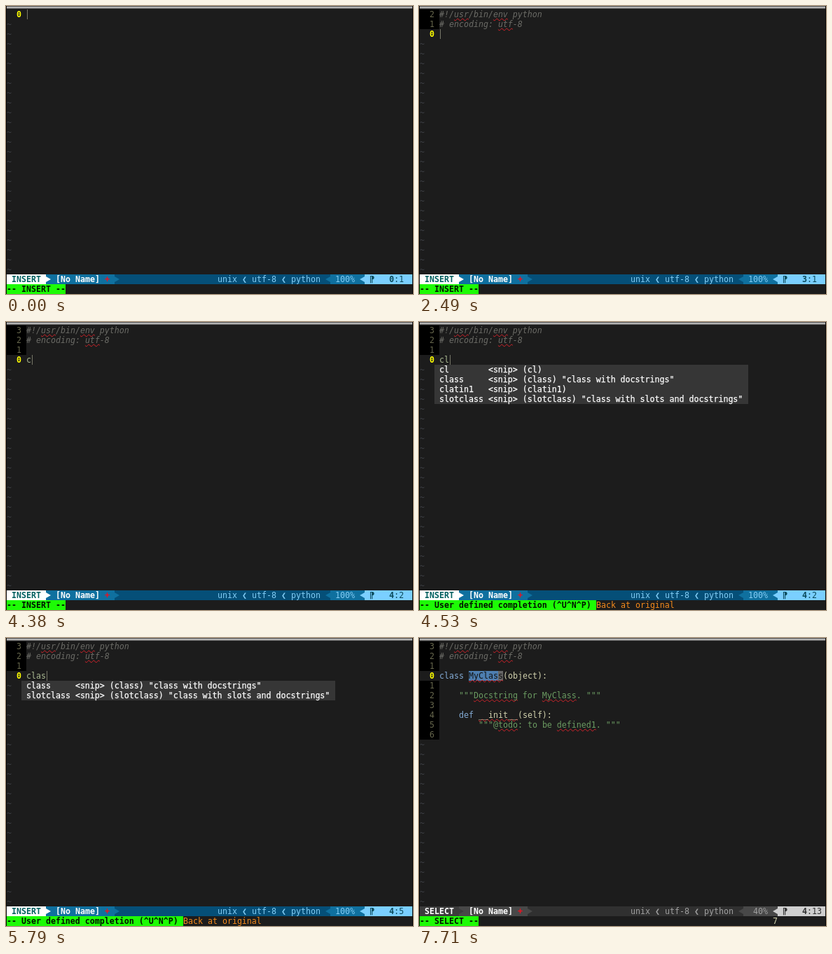
Animation of 581 by 411 pixels, one loop 8 s. Source, as an HTML page:

```html
<!DOCTYPE html>
<html lang="en">
<head>
<meta charset="utf-8">
<title>Snippet completion</title>
<style>
html, body { margin: 0; width: 100%; height: 100%; overflow: hidden; background: #1c1c1c; }
#stage {
  position: relative; width: 581px; height: 411px; overflow: hidden; background: #1c1c1c;
  font: 11.627px/14px "DejaVu Sans Mono", monospace;
  font-variant-ligatures: none;
  --a: #fff; --aText: #005f5f; --b: #0f709f; --c: #054f78; --cText: #83cdf5;
  --z: #7acfff; --zText: #0a4a5a;
}
#stage.select {
  --a: #3c3c3c; --aText: #fff; --b: #484848; --c: #303030; --cText: #a0a0a0;
  --z: #cfcfcf; --zText: #303030;
}
#stage::before {
  content: ""; position: absolute; inset: 0; z-index: 2;
  border: solid #050505; border-width: 0 1px;
  background: linear-gradient(#555 0 1px, #b4b4b4 1px 3px, #6a6a6a 3px 4px, transparent 4px) 0 0 / 100% 4px no-repeat;
}
#stage i, #stage b { position: absolute; display: block; height: 14px; white-space: pre; font-style: normal; font-weight: 400; }
#stage u { text-decoration: underline wavy #d3222a 1px; text-underline-offset: 1px; text-decoration-skip-ink: none; }
#stage .bold { font-weight: 700; }
#stage .tilde { color: #3e4146; }
#stage .num { color: #66664c; }
#stage .now { color: #ff0; font-weight: 700; }
#stage .com { color: #6b6b66; font-style: italic; }
#stage .txt { color: #d2d2ae; }
#stage .typed { color: #aab992; }
#stage .key { color: #84acd6; }
#stage .str { color: #6c9c62; }
#stage .pick { color: #111; }
#stage .pop { color: #fff; -webkit-text-stroke: .25px #fff; }
#stage .mode { color: var(--aText); font-weight: 700; }
#stage .file { color: #fff; font-weight: 700; }
#stage .plus { color: #f01020; font-weight: 700; }
#stage .info { color: var(--cText); }
#stage .pos { color: var(--zText); }
#stage .msg { color: #001400; font-weight: 700; }
#stage .err { color: #ff5555; font-weight: 700; }
#stage .back { color: #f58a1c; }
#stage .right { clip-path: polygon(0 3px, 100% 50%, 0 11px); }
#stage .left { clip-path: polygon(100% 3px, 0 50%, 100% 11px); }
</style>
</head>
<body>
<div id="stage"></div>
<script>
const stage = document.getElementById("stage");
const CW = 7, RH = 14, X0 = 1, Y0 = 5, BAR = 27, MSG = 28;

function cell(tag, col, row, cls) {
  const el = document.createElement(tag);
  el.className = cls;
  el.style.left = X0 + col * CW + "px";
  el.style.top = Y0 + row * RH + "px";
  stage.append(el);
  return el;
}

// Words between pipes get a spelling curl.
function text(col, row, str, cls) {
  const el = cell("i", col, row, cls);
  str.split("|").forEach((part, i) => {
    if (i % 2) el.appendChild(document.createElement("u")).textContent = part;
    else el.append(part);
  });
}

function box(col, row, cols, color, rows = 1, cls = "") {
  const el = cell("b", col, row, cls);
  el.style.width = cols * CW + "px";
  el.style.height = rows * RH + "px";
  el.style.background = color;
}

const bang = [[4, "#!/|usr|/bin/|env| python", "com"]];
const coding = [[4, "# encoding: |utf|-8", "com"]];
const typed = (s, cls = "typed") => [bang, coding, [], [[4, s, cls]]];
const body = [
  bang, coding, [],
  [[4, "class", "key"], [10, "|MyClass|", "pick"], [17, "(object):", "txt"]],
  [],
  [[8, '"""|Docstring| for |MyClass|. """', "str"]],
  [],
  [[8, "def", "key"], [12, "|__init__|(self):", "txt"]],
  [[12, '"""@|todo|: to be |defined1|. """', "str"]],
  []
];

const snip = (name, doc = "") => name.padEnd(10) + "<snip> (" + name + ")" + (doc && ' "' + doc + '"');
const cl = snip("cl"), latin = snip("clatin1");
const cls = snip("class", "class with docstrings");
const slots = snip("slotclass", "class with slots and docstrings");

const none = ["Pattern not found", "err"], back = ["Back at original", "back"];

const states = [
  { at: 0, lines: [[]], line: 0, col: 1, cursor: 4 },
  { at: 1020, lines: [[[4, "#", "com"]]], line: 1, col: 2, cursor: 5 },
  { at: 1470, lines: [[[4, "#!", "com"]]], line: 1, col: 3, cursor: 6, note: none },
  { at: 2490, lines: [bang, coding, []], line: 3, col: 1, cursor: 4 },
  { at: 3930, lines: typed(""), line: 4, col: 1, cursor: 4 },
  { at: 4380, lines: typed("c"), line: 4, col: 2, cursor: 5 },
  { at: 4530, lines: typed("cl"), line: 4, col: 2, cursor: 6, note: back, menu: [cl, cls, latin, slots] },
  { at: 4710, lines: typed("cla"), line: 4, col: 4, cursor: 7, note: back, menu: [cls, latin, slots] },
  { at: 5790, lines: typed("clas"), line: 4, col: 5, cursor: 8, note: back, menu: [cls, slots] },
  { at: 6030, lines: typed("class", "key"), line: 4, col: 6, cursor: 9, note: back, menu: [cls, slots] },
  { at: 7710, lines: body, line: 4, col: 13, select: true }
];

function drawBuffer(s) {
  const here = Math.max(s.line, 1) - 1;
  for (let r = 0; r < BAR; r++) {
    if (r >= s.lines.length) { text(0, r, "~", "tilde"); continue; }
    if (r !== here) box(0, r, 4, "#000");
    text(2, r, String(Math.abs(r - here)), r === here ? "now" : "num");
    if (s.select && r === here) {
      box(10, r, 6, "#4d7eb0");
      box(16, r, 1, "#666");
    }
    for (const [col, str, style] of s.lines[r]) text(col, r, str, style);
  }
  if (s.cursor) {
    const bar = cell("b", s.cursor, here, "");
    bar.style.cssText += "width:1px;margin-left:1px;background:#777768";
  }
  if (s.menu) {
    box(3, here + 1, 64, "#363636", s.menu.length);
    s.menu.forEach((item, i) => text(4, here + 1 + i, item, "pop"));
  }
}

function drawBar(s) {
  box(0, BAR, 83, "var(--c)");
  box(0, BAR, 8, "var(--a)");
  box(8, BAR, 14, "var(--b)");
  box(8, BAR, 1, "var(--a)", 1, "right");
  box(22, BAR, 1, "var(--b)", 1, "right");
  box(65, BAR, 1, "var(--b)", 1, "left");
  box(66, BAR, 7, "var(--b)");
  box(72, BAR, 1, "var(--z)", 1, "left");
  box(73, BAR, 10, "var(--z)");
  text(1, BAR, s.select ? "SELECT" : "INSERT", "mode");
  text(10, BAR, "[No Name]", "file");
  text(20, BAR, "+", "plus");
  text(43, BAR, "unix", "info");
  text(48, BAR, "❮", "info");
  text(50, BAR, "utf-8", "info");
  text(56, BAR, "❮", "info");
  text(58, BAR, "python", "info");
  text(67, BAR, s.select ? " 40%" : "100%", "info");
  text(74, BAR, "⁋", "pos bold");
  text(78, BAR, String(s.line), "pos bold");
  text(79, BAR, ":" + s.col, "pos");
}

function drawMessage(s) {
  const label = s.note ? "-- User defined completion (^U^N^P) " : s.select ? "-- SELECT --" : "-- INSERT --";
  box(0, MSG, label.length, "#1dfb05");
  text(0, MSG, label, "msg");
  if (s.note) text(label.length, MSG, ...s.note);
  if (s.select) text(72, MSG, "7", "txt");
}

let shown;
function tick() {
  const t = performance.now() % 8000;
  const s = states.findLast(st => st.at <= t);
  if (s !== shown) {
    shown = s;
    stage.replaceChildren();
    stage.classList.toggle("select", !!s.select);
    drawBuffer(s);
    drawBar(s);
    drawMessage(s);
  }
  requestAnimationFrame(tick);
}
tick();
</script>
</body>
</html>
```
